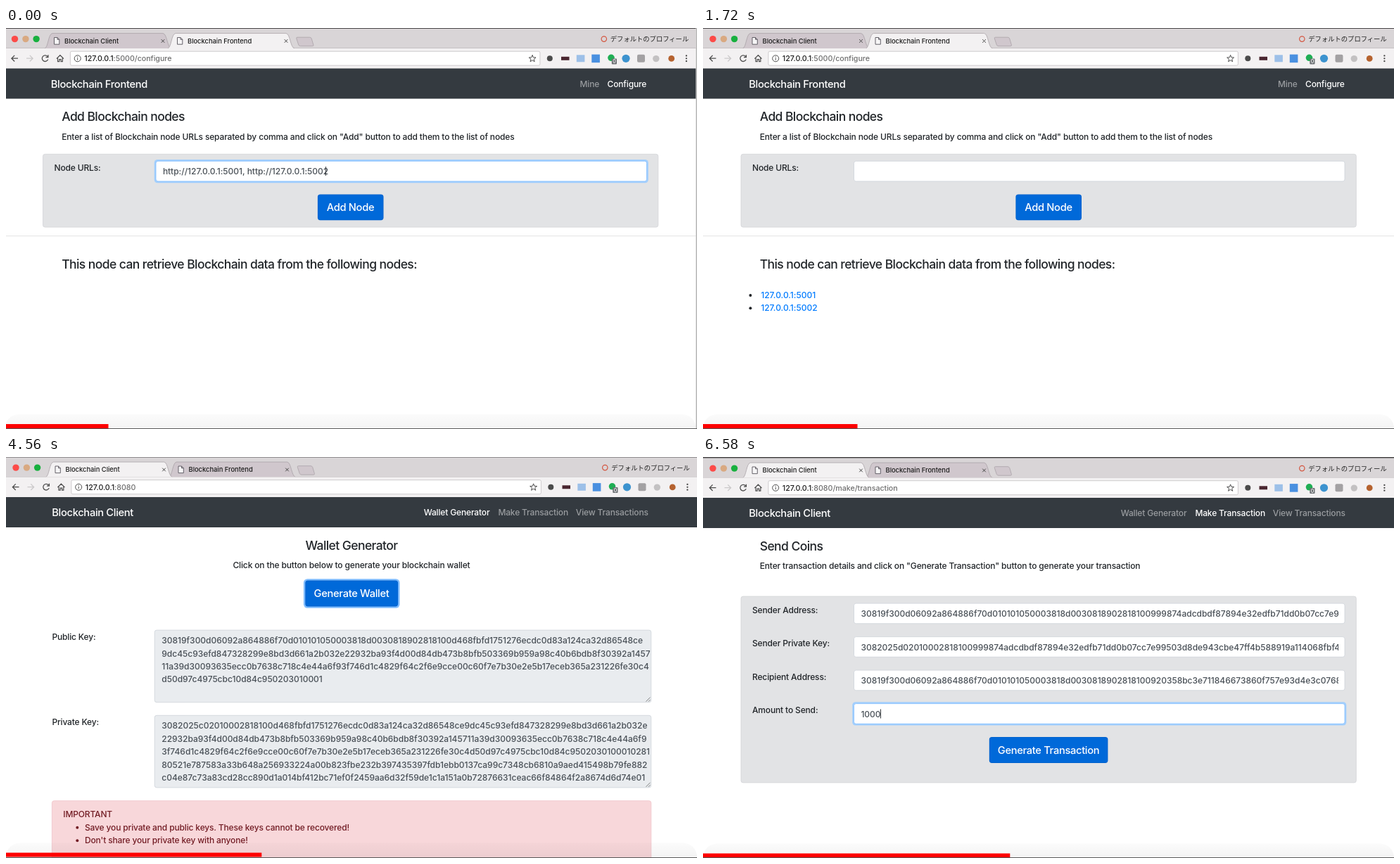
An HTML page that plays this animation: 982 px wide and 570 px high, repeating every 8 s.

```html
<!DOCTYPE html>
<html lang="en">
<head>
<meta charset="utf-8">
<title>Blockchain demo</title>
<style>
  html, body { margin: 0; width: 100%; height: 100%; overflow: hidden; background: #fff; }
  svg { display: block; width: 982px; height: 570px; }
  text { font-family: Inter, Roboto, sans-serif; font-weight: 450; font-optical-sizing: none; white-space: pre; }
  .body { font-size: 12px; letter-spacing: -.15px; }
  .value { font-size: 12px; letter-spacing: -.015px; }
  .big { font-size: 14.7px; letter-spacing: -.33px; }
  .head { font-size: 17.5px; letter-spacing: -.58px; font-weight: 540; }
  .tab { font-size: 9.4px; letter-spacing: -.02px; }
  .url { font-size: 10.7px; letter-spacing: -.04px; }
  .jp { font-family: "Noto Sans CJK JP", "Noto Sans CJK", sans-serif; font-size: 9.3px; font-weight: 400; }
  .badge { font-size: 7px; }
</style>
</head>
<body>
<svg id="stage" viewBox="0 0 982 570"></svg>
<script>
const INK = '#212529', FIELD = '#495057', BLUE = '#0069d9', LINK = '#007bff';

const rect = (x, y, w, h, fill, extra = '') =>
  `<rect x="${x}" y="${y}" width="${w}" height="${h}" fill="${fill}" ${extra}/>`;
const box = (x, y, w, h, fill, stroke) =>
  rect(x, y, w, h, fill, `rx="3" stroke="${stroke}" stroke-width=".8"`);
const disc = (x, y, r, fill, extra = '') =>
  `<circle cx="${x}" cy="${y}" r="${r}" fill="${fill}" ${extra}/>`;
const path = (d, stroke, width = 1, fill = 'none') =>
  `<path d="${d}" stroke="${stroke}" stroke-width="${width}" fill="${fill}"/>`;
const text = (cls, x, y, str, fill = INK, extra = '') =>
  `<text class="${cls}" x="${x}" y="${y}" fill="${fill}" ${extra}>${str}</text>`;
const centred = (cls, y, str, fill) => text(cls, 491, y, str, fill, 'text-anchor="middle"');
const caret = (x, y) => rect(x, y, .9, 13, INK);

// Browser window

function tab(x, label, active) {
  const fill = active ? '#f3f1f2' : '#d0c7cd';
  const d = `M${x} 29C${x + 5} 28 ${x + 5} 8 ${x + 11} 7.6H${x + 168}C${x + 174} 8 ${x + 174} 28 ${x + 180} 29`;
  const page = `M${x + 13.5} 13.5h4.5l2.8 2.8v6.9h-7.3zM${x + 18} 13.5v2.8h2.8`;
  const cx = x + 168, cy = 18.5;
  return path(d, '#aaa2a7', .8, fill) +
    path(page, '#55525a', .9, '#f7f6f7') +
    text('tab', x + 28, 21.8, label, '#1c1c1c') +
    path(`M${cx - 2.3} ${cy - 2.3}l4.6 4.6m0-4.6l-4.6 4.6`, '#444', 1);
}

function toolbar(host, rest) {
  const icon = '#4d4d4d';
  let s = rect(0, 29, 982, 29, '#f3f1f2');
  s += path('M18.5 43.2H9.5M13.7 38.9L9.4 43.2L13.7 47.5', icon, 1.3);
  s += path('M30.5 43.2H39.5M35.3 38.9L39.6 43.2L35.3 47.5', '#cbc9ca', 1.3);
  s += path('M60.5 40.5A4.3 4.3 0 1 0 61.2 44.6M61.4 38.3V41.6H58', icon, 1.3);
  s += path('M73.3 43.6L78.4 38.7L83.5 43.6M75 42.5V47.6H77.2V44.6H79.6V47.6H81.8V42.5', icon, 1.2);
  s += rect(92.9, 33.2, 667.5, 20, '#fff', 'rx="2" stroke="#c4c1c3" stroke-width=".8"');
  s += disc(103.2, 43.3, 4.5, 'none', `stroke="${icon}"`) + rect(102.7, 42.5, 1, 3.2, icon) + rect(102.7, 40.5, 1, 1.1, icon);
  s += text('url', 112.8, 47.1, `${host}<tspan fill="#6e6e6e">${rest}</tspan>`, '#1c1c1c');

  let star = '';
  for (let i = 0; i < 10; i++) {
    const r = i % 2 ? 2.2 : 5.2, a = i * Math.PI / 5;
    star += (i ? 'L' : 'M') + (749.6 + r * Math.sin(a)).toFixed(2) + ' ' + (43.6 - r * Math.cos(a)).toFixed(2);
  }
  s += path(star + 'Z', icon, 1);

  s += disc(774.3, 43.3, 4, '#4b4b4b') + rect(790.5, 40.8, 11.5, 5, '#4a2630');
  s += rect(812.3, 38.3, 11.6, 10, '#9dc0e8') + rect(833.8, 37.6, 11.6, 11.6, '#4a90e0');
  s += disc(861.5, 42.3, 4.8, '#1fae54');
  s += rect(862.3, 43.5, 7.2, 8, '#6b6f73', 'rx="1"') + text('badge', 863.7, 50, '0', '#fff');
  s += disc(882.5, 43.3, 5.6, '#3d93cf') + rect(898.5, 37.8, 11, 11, '#a3a1a3', 'rx="2"');
  s += disc(925.3, 43.6, 4.7, '#c3c1c2') + disc(947.2, 43.4, 4.4, '#b5622f');
  for (const y of [39.4, 43.3, 47.2]) s += disc(968.4, y, 1.15, '#444');
  return s;
}

function browser(active, host, rest) {
  let s = rect(0, 0, 982, 29.5, '#d9d5d7') + rect(0, -1, 982, 2, '#4b494a');
  s += disc(14, 15.6, 4.7, '#fc4b48') + disc(29.4, 15.6, 4.7, '#d9a981') + disc(44.6, 15.6, 4.7, '#18b03f');
  s += disc(851.3, 15.6, 3.7, 'none', 'stroke="#d4553f" stroke-width="1.2"');
  s += text('jp', 860.3, 19, 'デフォルトのプロフィール', '#222');
  s += path('M415.5 13.2H433Q435 13.2 435.7 15L438.4 24Q438.8 25.7 437 25.7H420Q418 25.7 417.3 24L414.3 15Q413.8 13.2 415.5 13.2Z', '#aaa2a7', .8, '#d0c7cd');
  s += rect(0, 28.5, 982, .8, '#b3adb1');
  const tabs = [tab(56.5, 'Blockchain Client', active === 0), tab(231.5, 'Blockchain Frontend', active === 1)];
  s += tabs[1 - active] + tabs[active];
  return s + toolbar(host, rest);
}

function navbar(brand, links, current) {
  return rect(0, 57.5, 982, 43, '#343a40') + text('big', 65.3, 84.7, brand, '#fff') +
    links.map(([x, label], i) => text('body', x, 83.9, label, i === current ? '#fff' : '#999c9f')).join('');
}

const frontend = () => browser(1, '127.0.0.1', ':5000/configure') +
  navbar('Blockchain Frontend', [[817, 'Mine'], [856, 'Configure']], 1);
const client = (rest, current) => browser(0, '127.0.0.1', rest) +
  navbar('Blockchain Client', [[593.7, 'Wallet Generator'], [699.4, 'Make Transaction'], [809.8, 'View Transactions']], current);

// Page parts

function input(y, value = '', focus = false) {
  const ring = focus ? rect(212.2, y - 2.3, 702.1, 33.3, '#a3cffc', 'rx="4.5"') : '';
  return ring + box(214.5, y, 697.5, 28.7, '#fff', focus ? '#80bdff' : '#ced4da') +
    text('value', 224.4, y + 18.9, value, FIELD, 'clip-path="url(#field)"');
}

function button(x, y, w, label, focus = false) {
  const ring = focus ? rect(x - 2.4, y - 2.4, w + 4.8, 41.6, '#80bdff', 'rx="5.5"') : '';
  return ring + rect(x, y, w, 36.8, '#0062cc', 'rx="3.7"') + rect(x + .8, y + .8, w - 1.6, 35.2, BLUE, 'rx="3"') +
    centred('big', y + 23.6, label, '#fff');
}

function area(y, label, lines) {
  const grip = `M909.5 ${y + 101.5}l6-6M913 ${y + 101.5}l2.5-2.5`;
  return text('body', 65.4, y + 13.9, label) + box(211.2, y, 705.6, 102.6, '#e9ecef', '#ced4da') +
    path(grip, '#666', .8) +
    lines.map((l, i) => text('value', 221.3, y + 19 + i * 18.42, l, FIELD)).join('');
}

const panel = (y, h) => box(54, y, 874.3, h, '#e2e3e5', '#d3d5d8');

// Key material shared by several fields
const head = '30819f300d06092a864886f70d010101050003818d0030818902818100';
const k1 = 'd468fbfd1751276ecdc0d83a124ca32d86548ce';
const k2 = '9dc45c93efd847328299e8bd3d661a2b032e';
const k3 = '22932ba93f4d00d84db473b8bfb503369b959a98c40b6bdb8f30392a1457';
const k4 = '11a39d30093635ecc0b7638c718c4e44a6f9';
const k5 = '3f746d1c4829f64c2f6e9cce00c60f7e7b30e2e5b17eceb365a231226fe30c4';
const k6 = 'd50d97c4975cbc10d84c950203010001';
const publicKey = [head + k1, k2 + k3, k4 + k5, k6];
const privateKey = ['3082025c02010002818100' + k1 + k2, k3 + k4, k5 + k6 + '0281',
  '80521e787583a33b648a256933224a00b823fbe232b397435397fdb1ebb0137ca99c7348cb6810a9aed415498b79fe882',
  'c04e87c73a83cd28cc890d1a014bf412bc71ef0f2459aa6d32f59de1c1a151a0b72876631ceac66f84864f2a8674d6d74e01'];
const sender = '999874adcdbdf87894e32edfb71dd0b07cc7e99503d8de943cbe47ff4b588919a114068fbf4a';

// Pages

function configure(added) {
  let s = frontend();
  s += text('head', 80.7, 132.2, 'Add Blockchain nodes');
  s += text('body', 80.7, 158.9, 'Enter a list of Blockchain node URLs separated by comma and click on "Add" button to add them to the list of nodes');
  s += panel(179.3, 103.8) + text('body', 70, 202.6, 'Node URLs:');
  s += added ? input(189.2) : input(189.2, 'http://127.0.0.1:5001, http://127.0.0.1:5002', true) + caret(455.6, 197);
  s += button(444.4, 236.4, 93.6, 'Add Node') + rect(0, 295.2, 982, .9, '#e2e2e2');
  s += text('head', 80.7, 341.8, 'This node can retrieve Blockchain data from the following nodes:');
  if (added) [5001, 5002].forEach((port, i) => {
    const y = 383.8 + i * 18.42;
    s += disc(67.4, y - 3.9, 2, INK) + text('value', 82.2, y, '127.0.0.1:' + port, LINK);
  });
  return s;
}

function wallet(made) {
  let s = client(':8080', 0);
  s += centred('head', 132.2, 'Wallet Generator');
  s += centred('body', 158.8, 'Click on the button below to generate your blockchain wallet');
  s += button(425.3, 176.1, 131.8, 'Generate Wallet', made);
  s += area(246.6, 'Public Key:', made ? publicKey : []);
  s += area(367.8, 'Private Key:', made ? privateKey : []);
  if (made) {
    const red = '#721c24';
    s += box(65.4, 489.2, 851.4, 110, '#f8d7da', '#f0c3c8') + text('body', 81.3, 512.8, 'IMPORTANT', red);
    ['Save you private and public keys. These keys cannot be recovered!', "Don't share your private key with anyone!"]
      .forEach((line, i) => {
        const y = 531.2 + i * 18.42;
        s += disc(101.3, y - 3.9, 2, red) + text('body', 112, y, line, red);
      });
  }
  return s;
}

function send() {
  let s = client(':8080/make/transaction', 1);
  s += text('head', 80.7, 132.2, 'Send Coins');
  s += text('body', 80.7, 158.9, 'Enter transaction details and click on "Generate Transaction" button to generate your transaction');
  s += panel(197.6, 264.8);
  [['Sender Address:', head + sender], ['Sender Private Key:', '3082025d02010002818100' + sender],
   ['Recipient Address:', head + '920358bc3e711846673860f757e93d4e3c0768'], ['Amount to Send:', '1000']]
    .forEach(([label, value], i) => {
      const y = 207.6 + i * 47.5;
      s += text('body', 70, y + 13.4, label) + input(y, value, i === 3);
    });
  return s + caret(252, 358) + button(406.8, 397.6, 168.6, 'Generate Transaction');
}

// start ms, offset x, offset y, progress width, page
const scenes = [
  [0, -1.5, 0, 145.5, configure(false)],
  [500, 0, 0, 219.5, configure(true)],
  [2540, 0, -.5, 290.3, wallet(false)],
  [4560, 0, -.5, 363.3, wallet(true)],
  [6580, 0, .5, 436.3, send()]
];

const stage = document.getElementById('stage');
stage.innerHTML = `<defs>
  <linearGradient id="shade" x1="0" y1="0" x2="0" y2="1">
    <stop offset="0" stop-opacity=".015"/><stop offset="1" stop-opacity=".075"/>
  </linearGradient>
  <clipPath id="field"><rect x="220" y="180" width="683" height="220"/></clipPath>
</defs>` + scenes.map(([, dx, dy, bar, page]) =>
  `<g visibility="hidden"><g transform="translate(${dx} ${dy})">${page}` +
  rect(0, 549, 982, 40, 'url(#shade)', 'rx="20"') + '</g>' +
  (dx ? rect(980.5, 0, 1.5, 570, '#b5b5b5') : '') +
  rect(0, 563 + dy, bar, 6, '#f00') + rect(0, 569, 982, 1, '#5a5a5a') + '</g>').join('');

const groups = [...stage.children].slice(1);
let shown = -1;

function draw(now) {
  const t = now % 8000;
  const i = scenes.findLastIndex(s => t >= s[0]);
  if (i !== shown) {
    groups.forEach((g, n) => g.setAttribute('visibility', n === i ? 'visible' : 'hidden'));
    shown = i;
  }
  requestAnimationFrame(() => draw(performance.now()));
}
draw(performance.now());
</script>
</body>
</html>
```
